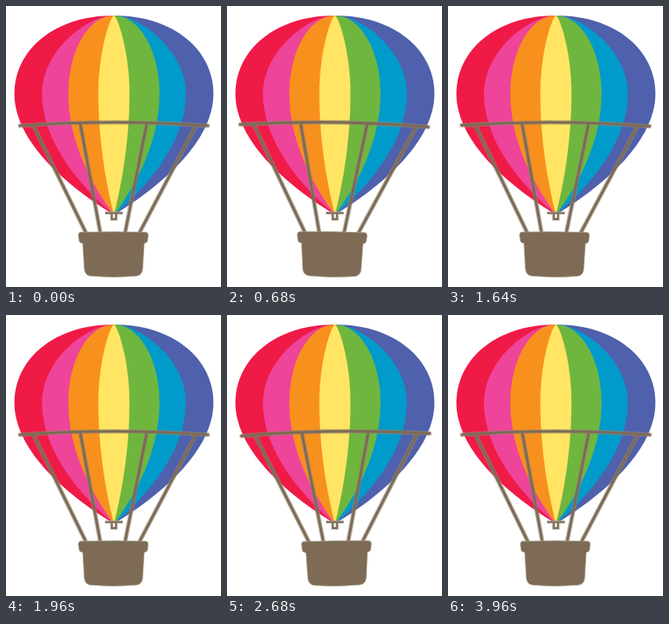
Animation, 269 px wide and 352 px high, one loop 4 s. Source, as an HTML page:

```html
<!DOCTYPE html>
<html lang="en">
<head>
<meta charset="utf-8">
<title>Hot air balloon</title>
<style>
  html, body { margin: 0; width: 100%; height: 100%; overflow: hidden; background: #fff; }
  svg { display: block; width: 100%; height: 100%; }
  .halo { stroke: #948572; stroke-opacity: .6; stroke-width: 5.6; }
  .core { stroke: #7d6b55; stroke-width: 3.2; }
</style>
</head>
<body>
<svg viewBox="0 0 269 352">
  <defs>
    <g id="rigging" fill="none" stroke-linecap="round">
      <path d="M35 151L100 284M93 148L118 284M176 148L149 284M237 151L167 284M17.500 150Q135 141.500 252.500 150"/>
    </g>
    <path id="knob" d="M124 259.300H146M132.300 260V267H137.700V260" fill="none"/>
  </defs>
  <g id="balloon"></g>
  <path d="M133 260H137V266H133Z" fill="#fff"/>
  <use href="#knob" stroke="#b0a495" stroke-width="3.600"/>
  <use href="#knob" stroke="#7d6b55" stroke-width="1.800"/>
  <g id="swing">
    <use href="#rigging" class="halo"/>
    <use href="#rigging" class="core"/>
    <path d="M93 283.300Q134 282.300 175 283.300Q178 284 178 287L177 294.500Q176.500 297 173 297.300L171 330Q170 337.500 163 338.300Q134 341 106 338.300Q99 337.500 98 330L96 297.300Q92 297 91.500 294.500L90.500 287Q90.500 284 93 283.300Z"
      fill="#7d6b55" stroke="#b0a495" stroke-width=".7"/>
  </g>
</svg>
<script>
  const PERIOD = 4000, MAX_TILT = 1, PIVOT = '135 90';

  // Nested panels from the outside in; shoulder is how full the top curve is.
  const panels = [
    { width: 124.5, shoulder: .6, left: '#f01a47', right: '#4f60ac' },
    { width: 90, shoulder: .36, left: '#ee4499', right: '#009bcb' },
    { width: 57, shoulder: .55, left: '#f8901e', right: '#6fb63f' },
    { width: 19.5, shoulder: .2, left: '#ffe563', right: '#ffe563' }
  ];

  function halfPanel(color, width, shoulder) {
    const x = part => 135 + part * width;
    return `<path fill="${color}" d="M135 12C${x(shoulder)} 12 ${x(1)} 55 ${x(1)} 110
      C${x(1)} 167 ${x(.52)} 222 135 261.500Z"/>`;
  }
  document.getElementById('balloon').innerHTML = panels.map(p =>
    halfPanel(p.left, -p.width, p.shoulder) + halfPanel(p.right, p.width, p.shoulder)).join('') +
    '<path d="M135 13V261" stroke="#ffe563"/>';

  const swing = document.getElementById('swing');
  function draw(now) {
    // Eases to rest at the centre as well as at both extremes.
    const wave = Math.sin(now / PERIOD * 2 * Math.PI);
    swing.setAttribute('transform', `rotate(${MAX_TILT * wave * Math.abs(wave)} ${PIVOT})`);
    requestAnimationFrame(draw);
  }
  draw(performance.now());
</script>
</body>
</html>
```
